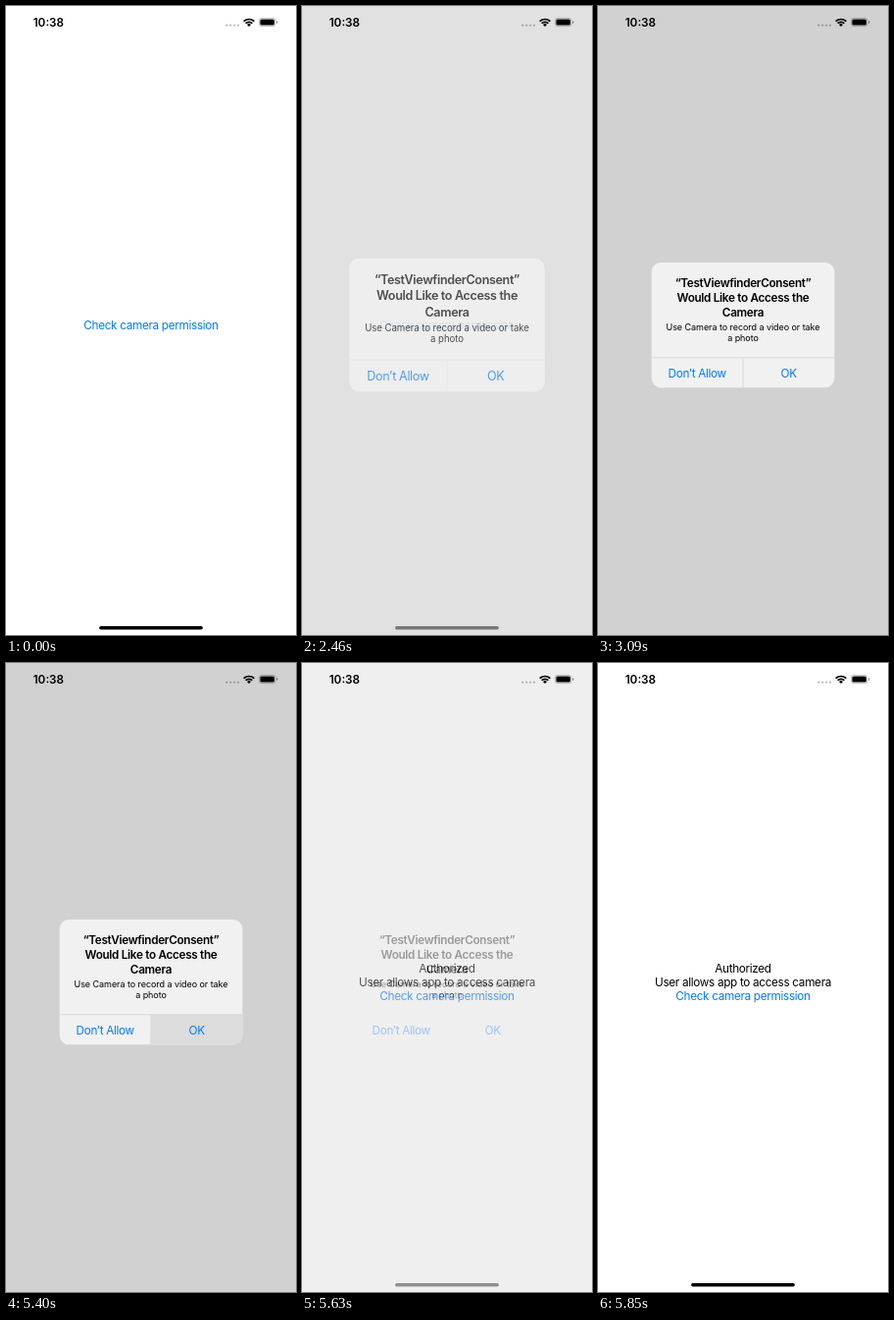
Animation, 296 px wide and 640 px high, one loop 5.99 s. Source, as an HTML page:

```html
<!DOCTYPE html>
<html lang="en">
<head>
<meta charset="utf-8">
<title>Camera permission</title>
<style>
  html, body { margin: 0; width: 100%; height: 100%; overflow: hidden; background: #fff; }
  svg { display: block; width: 296px; height: 640px; }
  text { font-family: Inter, "Open Sans", sans-serif; font-size: 11.76px; letter-spacing: -.32px; text-anchor: middle; }
  .bold { font-weight: 600; }
  .note { font-size: 9px; letter-spacing: -.055px; }
  .time { letter-spacing: 0; }
  .link { fill: #007aff; }
</style>
</head>
<body>
<svg viewBox="0 0 296 640">
  <rect width="296" height="640" fill="#fff"/>
  <g id="result">
    <text x="148" y="314.9">Authorized</text>
    <text x="148" y="328.9">User allows app to access camera</text>
  </g>
  <text id="button" class="link" x="148" y="328.7">Check camera permission</text>
  <rect id="dim" width="296" height="640"/>
  <g id="alert">
    <rect id="panel" x="54.6" y="261" width="186.8" height="127.2" rx="9.6"/>
    <path id="lines" d="M54.6 357.8H241.4M148 357.8V388.2" stroke="#c8c8c8" stroke-width=".6"/>
    <path id="pressed" d="M147.7 357.5H241.4V378.6A9.6 9.6 0 0 1 231.8 388.2H147.7Z" fill="#dcdcdc"/>
    <g class="bold">
      <text x="148" y="285.8">“TestViewfinderConsent”</text>
      <text x="148" y="301">Would Like to Access the</text>
      <text x="148" y="316.2">Camera</text>
    </g>
    <text class="note" x="148" y="330.2">Use Camera to record a video or take</text>
    <text class="note" x="148" y="341.2">a photo</text>
    <text class="link" x="101.2" y="377.5">Don’t Allow</text>
    <text class="link" x="194.6" y="377.5">OK</text>
  </g>
  <g id="status">
    <text class="bold time" x="43.4" y="21">10:38</text>
    <path d="M225.2 19.6h12" fill="none" stroke="#000" stroke-opacity=".25" stroke-width="2.4" stroke-linecap="round" stroke-dasharray="0 3.95"/>
    <g fill="none" stroke="#000" stroke-width="1.7">
      <path d="M242.6 15.7A7.7 7.7 0 0 1 253.4 15.7"/>
      <path d="M244.6 17.7A4.8 4.8 0 0 1 251.4 17.7"/>
    </g>
    <path d="M248 21L246 18.9A2.9 2.9 0 0 1 250 18.9Z"/>
    <rect x="258.35" y="12.35" width="16.6" height="8.3" rx="2.5" fill="none" stroke="#000" stroke-opacity=".35" stroke-width=".7"/>
    <rect x="259.4" y="13.4" width="14.5" height="6.2" rx="1.5"/>
    <path d="M276 15.2a1.4 1.4 0 0 1 0 2.8Z" fill-opacity=".4"/>
  </g>
  <rect id="home" x="95.1" y="631" width="105.8" height="3.46" rx="1.73"/>
</svg>
<script>
const LOOP = 5990;
const parts = Object.fromEntries(
  ["result", "button", "dim", "alert", "panel", "lines", "pressed", "home"]
    .map(id => [id, document.getElementById(id)]));

// Each pose holds until the next one; missing values fall back to the idle pose.
const idle = { link: 1, alert: 0, scale: 1, fill: "#f1f1f1", press: 0, home: 1, done: 0 };
const poses = [
  { at: 0 },
  { at: 2210, link: .17 },
  { at: 2460, link: .35, alert: .65, scale: 1.068, fill: "#f6f6f6", home: .47 },
  { at: 2570, alert: 1, scale: 1.01, home: 0 },
  { at: 2720, alert: 1, home: 0 },
  { at: 5400, alert: 1, press: 1, home: 0 },
  { at: 5520, alert: .83, press: .5, home: .1, done: 1 },
  { at: 5630, alert: .35, home: .4, done: 1 },
  { at: 5740, alert: .1, home: .8, done: 1 },
  { at: 5850, done: 1 }
].map(p => ({ ...idle, ...p }));

const fade = (el, v) => el.setAttribute("opacity", v);

function draw(t) {
  const p = poses.findLast(q => q.at <= t);
  fade(parts.result, p.done);
  fade(parts.button, p.link);
  parts.button.setAttribute("y", p.done ? 342.9 : 328.7);
  fade(parts.dim, .18 * p.alert);
  fade(parts.alert, p.alert);
  parts.alert.setAttribute("transform",
    `translate(148 324.6) scale(${p.scale}) translate(-148 -324.6)`);
  parts.panel.setAttribute("fill", p.fill);
  fade(parts.lines, p.alert ** 2);
  fade(parts.pressed, p.press);
  fade(parts.home, p.home);
}

const start = performance.now();
function tick() {
  draw((performance.now() - start) % LOOP);
  requestAnimationFrame(tick);
}
tick();
</script>
</body>
</html>
```
